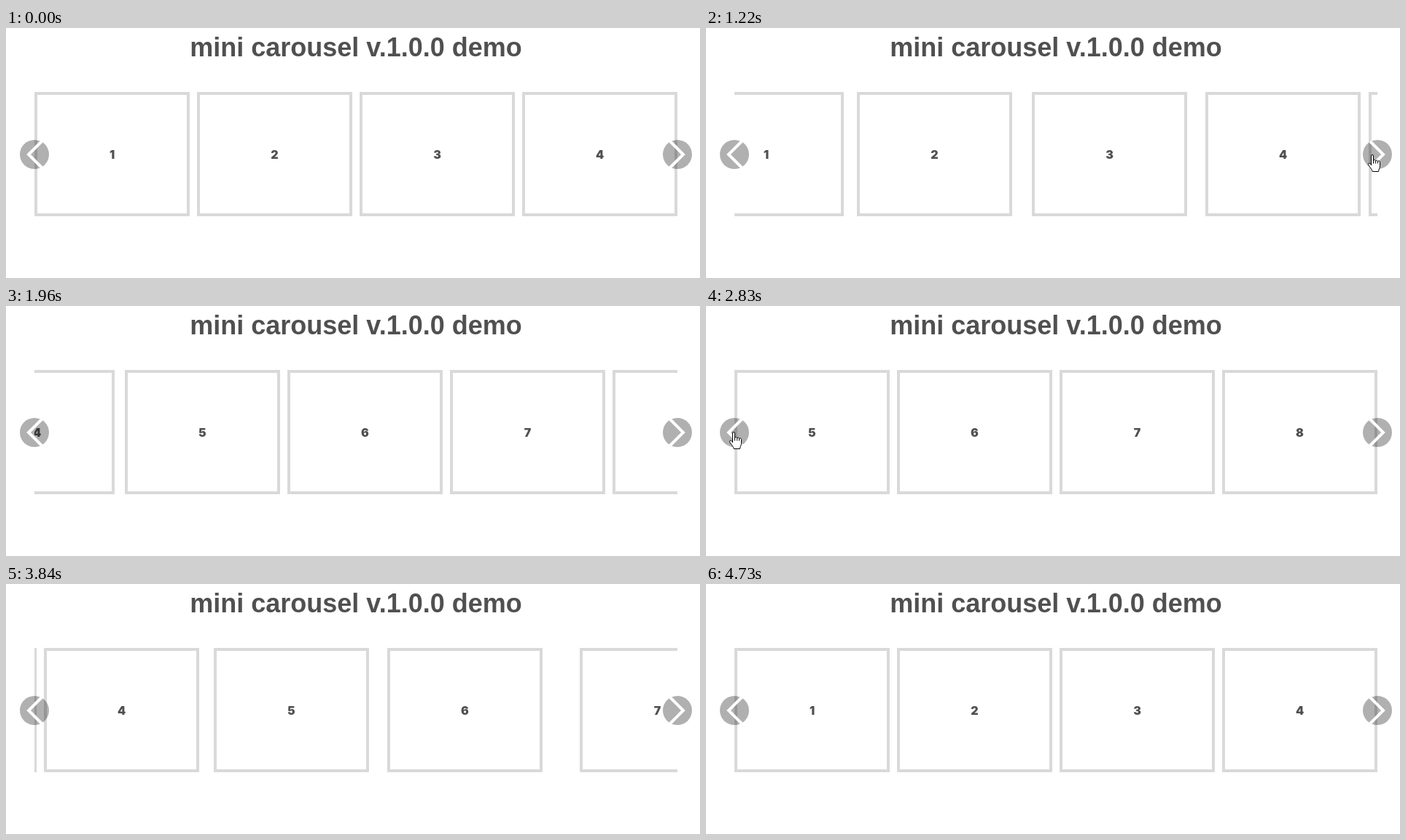
Recreate the animation shown at these times as an HTML page. Size 952 by 344 pixels, loop 5590 ms.

```html
<!DOCTYPE html>
<html lang="en">
<head>
<meta charset="utf-8">
<title>mini carousel demo</title>
<style>
  html, body { margin: 0; width: 100%; height: 100%; overflow: hidden; background: #fff; }
  svg { display: block; }
  text { fill: #505050; text-anchor: middle; }
  .title { font: bold 36px "Liberation Sans", Arial, sans-serif; }
  .card rect { fill: #fff; stroke: #d9d9d9; stroke-width: 4; }
  .card text { font: 900 16px Inter, "Open Sans", sans-serif; }
  .button circle { fill: rgba(0, 0, 0, .31); }
  .button path { fill: none; stroke: #fff; stroke-width: 4; }
  #cursor path { fill: #fff; stroke: #000; }
</style>
</head>
<body>
<svg width="952" height="344" viewBox="0 0 952 344">
  <clipPath id="view"><rect x="39" y="88" width="882" height="171"/></clipPath>
  <text class="title" x="480" y="39">mini carousel v.1.0.0 demo</text>
  <g id="cards" clip-path="url(#view)"></g>
  <g class="button" transform="translate(39 174)">
    <circle r="20"/><path d="M10-18L-8 0L10 18"/>
  </g>
  <g class="button" transform="translate(921 174) scale(-1 1)">
    <circle r="20"/><path d="M10-18L-8 0L10 18"/>
  </g>
  <g id="cursor">
    <path id="arrow" d="M.5.5v16l3.7-3.6 2.5 5.6 2.6-1.1-2.5-5.5h5z"/>
    <path id="hand" d="M-1.5 14V1a1.5 1.5 0 0 1 3 0v7c0-2 3.2-2 3.2.3 0-1.8 2.9-1.5 2.9.6 0-1.5 2.9-1.2 2.9.8v5c0 3-1.5 4-2 7.8H.2c-.4-2.5-2.7-5-5.2-8.5-1.8-2.6 1-4.2 3.5-1M1.5 8v3.5M4.7 8.3v3.2M7.6 9v2.5"/>
  </g>
</svg>
<script>
const LOOP = 5590, PITCH = 223, COUNT = 8, PAGE = 4 * PITCH;

// leads: head start in ms of each card, counted from the outgoing edge
const forward = { start: 1088.3, dur: 1185.5, trim: 7, leads: [109, 90, 45] };
const back = { start: 3380.1, dur: 1266.3, trim: 24, leads: [116, 85, 23] };

// Pointer routes: [time, x, y]; the pointer is hidden between routes
const routes = [
  [[70, 940, 340], [300, 930, 255], [550, 914, 175], [1700, 914, 175], [1840, 915, 267], [1900, 915, 350]],
  [[2350, 20, 312], [2440, 22, 292], [2700, 38, 174], [3570, 38, 174], [3700, 26, 195]]
];

const $ = id => document.getElementById(id);

$("cards").innerHTML = Array.from({ length: COUNT }, (_, i) =>
  `<g class="card"><rect x="2" y="90" width="209" height="167"/>
   <text x="106.5" y="180">${i + 1}</text></g>`).join("");
const cards = [...$("cards").children];

function ease(x) {
  x = Math.min(1, Math.max(0, x));
  return x < .5 ? 2 * x * x : 1 - 2 * (1 - x) ** 2;
}

function travel(move, rank, t) {
  const lead = move.leads[rank] || 0;
  const dur = move.dur + lead - (rank < 4 ? move.trim : 0);
  return PAGE * ease((t - move.start + lead) / dur);
}

function pointerAt(t) {
  for (const route of routes) {
    for (let i = 1; i < route.length; i++) {
      const [t0, x0, y0] = route[i - 1], [t1, x1, y1] = route[i];
      if (t < t0 || t >= t1) continue;
      const p = (t - t0) / (t1 - t0);
      return [Math.round(x0 + (x1 - x0) * p), Math.round(y0 + (y1 - y0) * p)];
    }
  }
}

function show(el, on) {
  el.setAttribute("visibility", on ? "visible" : "hidden");
}

function draw(now) {
  const t = now % LOOP;
  cards.forEach((card, i) => {
    const shift = travel(back, COUNT - 1 - i, t) - travel(forward, i, t);
    card.setAttribute("transform", `translate(${Math.round(39 + i * PITCH + shift)} 0)`);
  });

  const pos = pointerAt(t);
  const over = pos && [39, 921].some(x => Math.hypot(pos[0] - x, pos[1] - 174) < 20);
  show($("hand"), over);
  show($("arrow"), pos && !over);
  if (pos) $("cursor").setAttribute("transform", `translate(${pos})`);
}

const begin = performance.now();
function tick() {
  draw(performance.now() - begin);
  requestAnimationFrame(tick);
}
tick();
</script>
</body>
</html>
```
